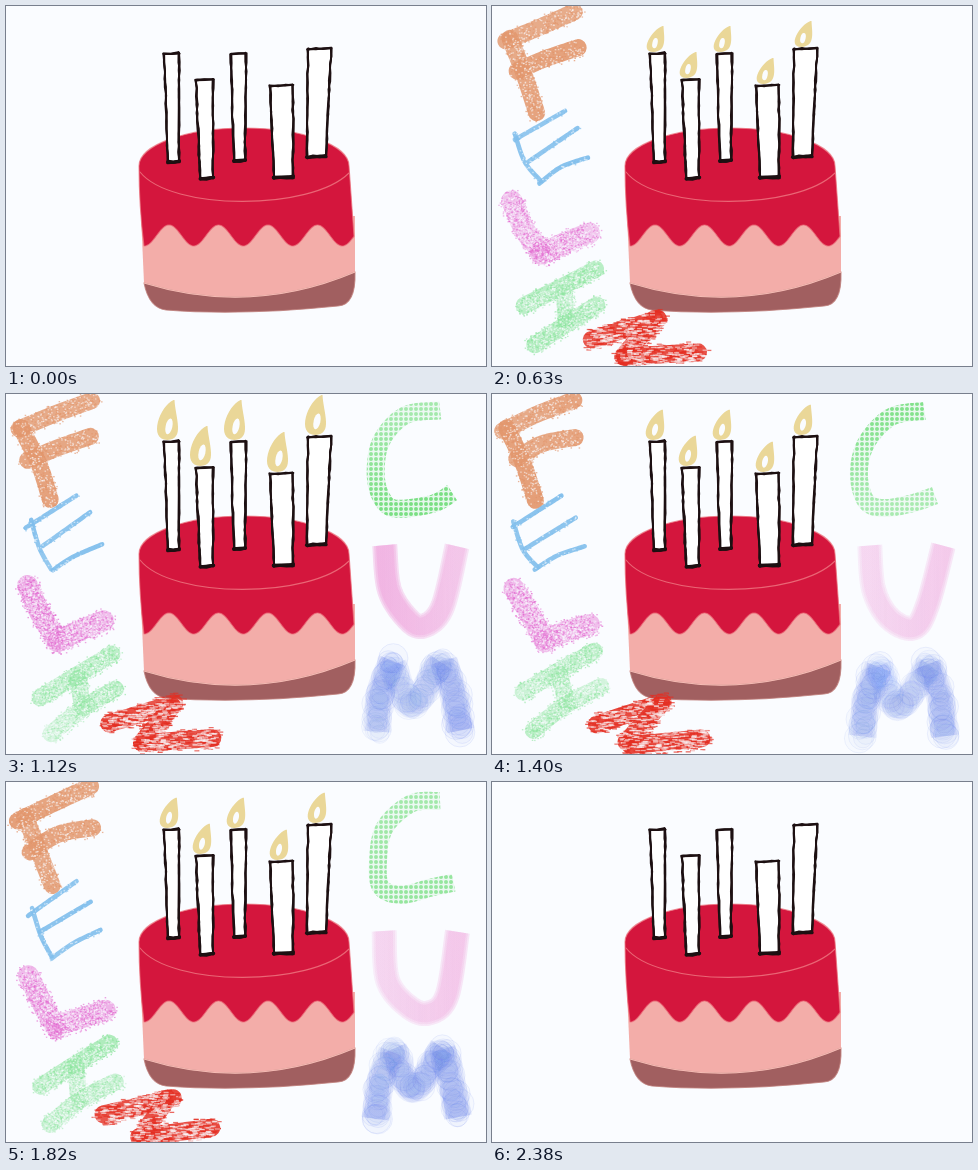
These frames come from a looping animation (480 px wide and 360 px high, 2660 ms). An HTML page with a canvas:

```html
<!DOCTYPE html>
<html lang="es">
<head>
<meta charset="utf-8">
<title>Feliz Cum</title>
<style>
html, body { margin: 0; width: 100%; height: 100%; overflow: hidden; background: #fafcff; }
canvas { display: block; width: 480px; height: 360px; }
</style>
</head>
<body>
<canvas id="stage" width="480" height="360"></canvas>
<script>
const W = 480, H = 360, LOOP = 2660, START = 350, STEP = 70, STEPS = 29, VARIANTS = 8;
const ctx = document.getElementById('stage').getContext('2d');

function layer() {
  const c = document.createElement('canvas');
  c.width = W; c.height = H;
  return c.getContext('2d');
}

function seeded(n) {
  return () => {
    n = (n + 0x6D2B79F5) | 0;
    let t = Math.imul(n ^ (n >>> 15), 1 | n);
    t = (t + Math.imul(t ^ (t >>> 7), 61 | t)) ^ t;
    return ((t ^ (t >>> 14)) >>> 0) / 4294967296;
  };
}

const mix = (a, b, t) => a + (b - a) * t;

// Smooth curve through key points, sampled about every 2 px
function curve(p) {
  const out = [];
  for (let i = 0; i < p.length - 1; i++) {
    const a = p[Math.max(i - 1, 0)], b = p[i], c = p[i + 1], d = p[Math.min(i + 2, p.length - 1)];
    const n = Math.ceil(Math.hypot(c[0] - b[0], c[1] - b[1]) / 2);
    for (let k = 0; k < n; k++) {
      const t = k / n;
      out.push([0, 1].map(j => 0.5 * (2 * b[j] + (c[j] - a[j]) * t +
        (2 * a[j] - 5 * b[j] + 4 * c[j] - d[j]) * t * t +
        (3 * b[j] - a[j] - 3 * c[j] + d[j]) * t * t * t)));
    }
  }
  out.push(p[p.length - 1]);
  return out;
}

function trace(g, pts) {
  g.beginPath();
  pts.forEach(p => g.lineTo(p[0], p[1]));
}

// ---------- cake ----------
// left, top, width, height, shift of the foot
const CANDLES = [
  [158, 48, 15, 108, 4], [190, 74, 17, 99, 4], [225, 48, 15, 107, 3], [264, 80, 23, 92, 4], [302, 43, 23, 108, -1]
];

function drawCandle(g, [x, y, w, h, lean], rnd) {
  const q = [[x, y], [x + w, y - 1], [x + w + lean - 4, y + h - 1], [x + lean, y + h]];
  trace(g, q);
  g.fillStyle = '#fff';
  g.fill();
  g.strokeStyle = '#1d1012';
  for (let pass = 0; pass < 3; pass++) {
    q.forEach((a, i) => {
      const b = q[(i + 1) % 4], pts = [];
      const n = Math.ceil(Math.hypot(b[0] - a[0], b[1] - a[1]) / 9);
      for (let k = 0; k <= n; k++) pts.push([0, 1].map(j => mix(a[j], b[j], k / n) + (rnd() - 0.5) * 1.6));
      trace(g, pts);
      g.lineWidth = i === 2 ? 3 : 1.8;
      g.stroke();
    });
  }
}

function drawCake(g) {
  const edge = (path, color) => { g.strokeStyle = color; g.stroke(path); };
  g.lineJoin = g.lineCap = 'round';
  g.lineWidth = 1.1;

  const seam = 'M138 277 Q245 310 349 266';
  const foot = 'Q350 299 332 300 Q235 310 160 304 Q143 302 138 277';
  const sponge = new Path2D('M135 210 L138 277 Q245 310 349 266 L349 210 Z');
  const base = new Path2D(seam + foot);
  g.fillStyle = '#f3ada9';
  g.fill(sponge);
  g.fillStyle = '#a15f60';
  g.fill(base);

  // Icing: half ellipse above, a wave of drips below
  const icing = new Path2D();
  icing.ellipse(238, 160, 105, 38, 0, Math.PI, 0);
  for (let x = 348; x >= 138; x--) icing.lineTo(x, 229.5 - 10.5 * Math.cos((x - 163) / 49.5 * 2 * Math.PI));
  icing.quadraticCurveTo(133, 200, 133, 160);
  g.fillStyle = '#d4163d';
  g.fill(icing);
  edge(icing, 'rgba(235,110,122,.75)');
  edge(new Path2D('M134 166 C165 205 305 205 343 167'), '#ea6675');
  edge(base, 'rgba(190,125,122,.8)');
  edge(new Path2D(seam), '#f5bab3');

  const rnd = seeded(7);
  CANDLES.forEach(c => drawCandle(g, c, rnd));
}

// Each flame leaps up, then sinks over six steps
function drawFlames(step) {
  const sink = ((step + 1) % 6) / 5;
  for (const [left, top, width] of CANDLES) {
    const h = 40 - 14 * sink ** 1.6, w = 7 + h * 0.32;
    const x = left + width / 2 - 3, y = top - 2, tx = x + 5 + 3 * sink, ty = y - h;
    ctx.beginPath();
    ctx.moveTo(tx, ty);
    ctx.bezierCurveTo(tx - w * 0.7, ty + h * 0.15, x - w * 1.05, y, x - 1, y);
    ctx.bezierCurveTo(x + w * 0.85, y - 1, tx + w * 0.1, ty + h * 0.45, tx + 1, ty);
    ctx.fillStyle = '#ead798';
    ctx.fill();
    ctx.beginPath();
    ctx.ellipse(x + 0.5, y - h * 0.34, w * 0.17, h * 0.2, 0.22, 0, 7);
    ctx.fillStyle = '#fafcff';
    ctx.fill();
  }
}

// ---------- letters: key points of each stroke, and a brush ----------
const LETTERS = [
  { brush: 'chalk', rgb: '226,150,108', w: 17, base: .92, grain: .12,
    strokes: [[[13, 36], [48, 18], [83, 4]], [[16, 33], [32, 68], [46, 103]], [[24, 66], [53, 51], [86, 42]]] },
  { brush: 'chalk', rgb: '128,190,236', w: 4.6, base: .95, grain: .06,
    strokes: [[[20, 135], [69, 103]], [[23, 130], [32, 155], [45, 176]], [[33, 154], [83, 122]], [[45, 176], [67, 164], [94, 152]]] },
  { brush: 'chalk', rgb: '226,105,208', w: 21, base: .55, grain: .35, fade: .4,
    strokes: [[[20, 191], [34, 222], [49, 245]], [[49, 245], [72, 236], [97, 226]]] },
  { brush: 'chalk', rgb: '140,228,158', w: 17, base: .7, grain: .28, fade: .6,
    strokes: [[[33, 300], [66, 280], [103, 259]], [[70, 282], [73, 311]], [[44, 338], [74, 314], [107, 295]]] },
  { brush: 'chalk', rgb: '228,46,34', w: 18, base: .9, grain: .14, streak: 5,
    strokes: [[[100, 329], [168, 311]], [[165, 312], [134, 350]], [[134, 350], [206, 344]]] },
  { brush: 'dots', rgb: '118,222,128', w: 18, base: 1, fade: .4,
    strokes: [[[433, 16], [402, 22], [378, 46], [368, 78], [374, 103], [393, 112], [425, 107], [447, 99]]] },
  { brush: 'soft', rgb: '238,158,218', w: 25, base: .85, fade: .6,
    strokes: [[[379, 148], [383, 195], [400, 224], [420, 230], [438, 211], [453, 150]]] },
  { brush: 'water', rgb: '105,128,232', w: 28, base: .32, fade: .5,
    strokes: [[[371, 340], [378, 300], [389, 270]], [[389, 270], [408, 310], [438, 267]], [[438, 267], [448, 300], [456, 338]]] }
];

// Loose grains roughen the edge, erased ones show the paper
function grains(g, pts, o, alpha, rnd) {
  const n = pts.length * 2 * o.w * o.grain, long = o.streak || 1.5;
  for (const erase of [false, true]) {
    g.globalCompositeOperation = erase ? 'destination-out' : 'source-over';
    for (let i = 0; i < n; i++) {
      const t = rnd(), p = pts[Math.floor(t * pts.length)];
      const angle = rnd() * 7, r = o.w * 0.64 * Math.sqrt(rnd());
      g.fillStyle = `rgba(${o.rgb},${erase ? 0.55 : 0.75 * alpha(t)})`;
      g.fillRect(p[0] + Math.cos(angle) * r - long / 2, p[1] + Math.sin(angle) * r, long, 1.3);
    }
  }
  g.globalCompositeOperation = 'source-over';
}

function wash(g, pts, o, alpha, rnd) {
  pts.forEach((p, i) => {
    const a = alpha(i / pts.length);
    g.beginPath();
    g.arc(p[0] + (rnd() - 0.5) * 7, p[1] + (rnd() - 0.5) * 7, o.w * mix(0.28, 0.54, rnd()), 0, 7);
    g.fillStyle = `rgba(${o.rgb},${a * 0.04})`;
    g.fill();
    g.strokeStyle = `rgba(${o.rgb},${a * 0.16})`;
    g.lineWidth = 0.8;
    g.stroke();
  });
}

function halftone(g) {
  const m = layer();
  m.fillStyle = 'rgba(0,0,0,.15)';
  m.fillRect(0, 0, W, H);
  m.fillStyle = '#000';
  m.beginPath();
  for (let y = 0; y < 140; y += 5) {
    for (let x = 340; x < W; x += 5) {
      m.moveTo(x, y);
      m.arc(x, y, 2, 0, 7);
    }
  }
  m.fill();
  g.globalCompositeOperation = 'destination-in';
  g.drawImage(m.canvas, 0, 0);
}

// One redrawing of a letter: shifted a little, with uneven pressure
function paint(o, seed) {
  const g = layer(), rnd = seeded(seed);
  const wobble = d => (rnd() * 2 - 1) * d;
  const dx = wobble(3), dy = wobble(3);
  const soft = o.brush === 'soft' || o.brush === 'water';
  g.lineJoin = 'round';
  g.lineCap = soft || o.brush === 'dots' ? 'butt' : 'round';
  for (const keys of o.strokes) {
    const pts = curve(keys.map(([x, y]) => [x + dx + wobble(2.5), y + dy + wobble(2.5)]));
    const from = 1 - rnd() * (o.fade || 0.15), to = 1 - rnd() * (o.fade || 0.15);
    const alpha = t => mix(from, to, t);
    const tint = g.createLinearGradient(...pts[0], ...pts[pts.length - 1]);
    for (const t of [0, 1]) tint.addColorStop(t, `rgba(${o.rgb},${alpha(t) * o.base})`);
    g.strokeStyle = tint;
    g.globalAlpha = soft ? 0.45 : 1;
    trace(g, pts);
    for (const k of soft ? [1, 0.86, 0.7] : [1]) {
      g.lineWidth = o.w * k;
      g.stroke();
    }
    g.globalAlpha = 1;
    if (o.brush === 'chalk') grains(g, pts, o, alpha, rnd);
    if (o.brush === 'water') wash(g, pts, o, alpha, rnd);
  }
  if (o.brush === 'dots') halftone(g);
  return g.canvas;
}

const tiles = LETTERS.map((o, i) => Array.from({ length: VARIANTS }, (_, k) => paint(o, i * 31 + k * 7 + 5)));
const cake = layer();
drawCake(cake);

function draw(time) {
  const step = Math.floor((time - START) / STEP);
  ctx.fillStyle = '#fafcff';
  ctx.fillRect(0, 0, W, H);
  ctx.drawImage(cake.canvas, 0, 0);
  if (step < 0 || step >= STEPS) return;
  drawFlames(step);
  // Letters arrive one by one and leave in reverse
  tiles.forEach((set, i) => {
    if (step >= i && step < STEPS - i) ctx.drawImage(set[step % VARIANTS], 0, 0);
  });
}

const begin = performance.now();
function tick() {
  draw((performance.now() - begin) % LOOP);
  requestAnimationFrame(tick);
}
tick();
</script>
</body>
</html>
```
